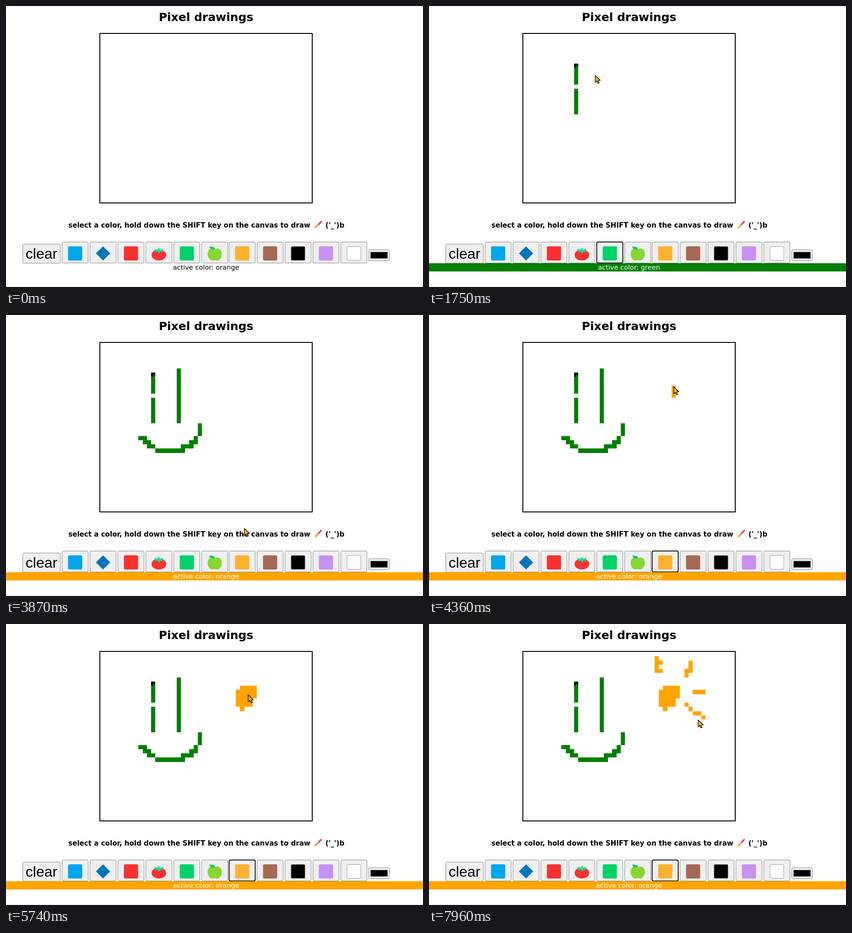
An HTML page that plays this animation: 911 by 615 pixels, repeating every 8 s.

```html
<!DOCTYPE html>
<html lang="en">
<head>
<meta charset="utf-8">
<title>Pixel drawings</title>
<style>
  html, body { margin: 0; width: 100%; height: 100%; overflow: hidden; background: #fff; }
  svg { display: block; width: 911px; height: 615px; }
  text { font-family: "DejaVu Sans", sans-serif; text-anchor: middle; }
  .bold { font-weight: bold; }
  .button { fill: #efefef; stroke: #858585; }
</style>
</head>
<body>
<svg viewBox="0 0 911 615">
  <text class="bold" x="437" y="33" font-size="25">Pixel drawings</text>
  <rect x="205" y="60" width="464" height="371" fill="none" stroke="#000" stroke-width="2"/>
  <g id="cells" shape-rendering="crispEdges"></g>
  <path id="speck" d="M317 126h9v8l-5-5v6h-4z"/>

  <text class="bold" x="400.5" y="485" font-size="15.1">select a color, hold down the SHIFT key on the canvas to draw</text>
  <g stroke-linecap="round">
    <path d="M688.5 472L681 480" stroke="#f8395c" stroke-width="3.6"/>
    <path d="M681.5 479.5L679.5 481.5" stroke="#b4acbc" stroke-width="4"/>
    <path d="M673.5 487q1-6 4-6.5q4 0 3.5 3q-1 3-7.5 3.5z" fill="#ffb43c"/>
  </g>
  <text class="bold" x="718.5" y="485" font-size="15.1">('_')b</text>

  <rect class="button" x="36.5" y="521" width="82" height="42" rx="2.5"/>
  <text x="77.5" y="553" font-size="32" style="font-family:'Liberation Sans',Arial,sans-serif">clear</text>
  <g id="buttons"></g>
  <rect class="button" x="792.5" y="533.5" width="45" height="24" rx="2.5"/>
  <rect x="796.5" y="538.5" width="37" height="14" stroke="#777"/>
  <rect id="ring" y="516.5" width="57" height="46" rx="3" fill="none" stroke="#101010" stroke-width="2"/>

  <rect id="bar" y="563" width="911" height="18"/>
  <text id="label" x="437" y="577" font-size="14.5"></text>
  <rect y="614" width="911" height="1" fill="#dedede"/>
  <path id="cursor" d="M0 0V15.3L3.6 12L6.2 17.6L8.8 16.4L6.3 11H11.3Z" fill="#fbb117" stroke="#000" stroke-width="1.2" stroke-linejoin="round"/>
</svg>
<script>
const LOOP = 8000, CELL = 9.25, LEFT = 206, TOP = 61;
const GREEN_CLICK = 420, ORANGE_CLICK = 3720;
const GREEN_BUTTON = 4, ORANGE_BUTTON = 6;
const $ = id => document.getElementById(id);
const colorAt = t => t >= GREEN_CLICK && t < ORANGE_CLICK ? 'green' : 'orange';

// Buttons
const square = (fill, stroke = fill) =>
  `<rect x="-15" y="-15" width="30" height="30" rx="2" fill="${fill}" stroke="${stroke}"/>`;
const icons = [
  square('#00a6ed'),
  '<path d="M0-15L15 0L0 15L-15 0Z" fill="#0074ba" stroke="#0074ba" stroke-linejoin="round"/>',
  square('#f8312f'),
  `<ellipse cy="3.5" rx="16" ry="12" fill="#f8312f"/>
   <path d="M-1.5-12h3v4l10-2l-5 4l4 4l-7-2l-3 5l-3-5l-7 2l3-4l-6-4l11 2z" fill="#00e58c"/>`,
  square('#00d26a'),
  `<path d="M0-8C5-13 15-11 15.5 0C16 10 9 16 5 15.5Q0 14-5 15.5C-9 16-16 10-15.5 0C-15-11-5-13 0-8Z" fill="#86d72f"/>
   <path d="M1-9q-1-7-13-6q2 9 13 6z" fill="#00cf68"/>`,
  square('#ffb02e'), square('#a56953'), square('#000', '#555'),
  square('#c790f1'), square('#fff', '#9b9b9b')
];
const buttonX = i => Math.round(122 + 60.9 * i) + 0.5;
$('buttons').innerHTML = icons.map((icon, i) =>
  `<g transform="translate(${buttonX(i)} 516.5)">
     <rect class="button" width="57" height="46" rx="2.5"/>
     <g transform="translate(28.5 25)">${icon}</g></g>`).join('');

// Shapes, each a list of grid cells in drawing order
function line(x0, y0, x1, y1, step = 1) {
  const n = Math.max(Math.abs(x1 - x0), Math.abs(y1 - y0)) / step;
  return Array.from({ length: n + 1 }, (_, i) =>
    [Math.round(x0 + (x1 - x0) * i / n), Math.round(y0 + (y1 - y0) * i / n)]);
}

function smile() {
  return Array.from({ length: 67 }, (_, i) => {
    const x = 9.7 + 0.2 * i;
    return [Math.floor(x), Math.floor(25.85 - 0.0627 * Math.abs(x - 16.45) ** 2.13)];
  });
}

// Band of a slanted ellipse, traced counterclockwise from the lower right
function sun(inner, outer) {
  const cells = [];
  for (let col = 30; col < 39; col++) {
    for (let row = 6; row < 15; row++) {
      const dx = col - 33.8, dy = row - 10.15;
      const level = dx * dx + dy * dy + 0.7 * dx * dy;
      const turn = (Math.atan2(dx, dy) - 0.5 + 2 * Math.PI) % (2 * Math.PI);
      if (level >= inner && level < outer) cells.push({ turn, at: [col, row] });
    }
  }
  return cells.sort((a, b) => a.turn - b.turn).map(cell => cell.at);
}

// Cursor stops outside the strokes: time, x, y
const path = [
  [70, 425, 606],
  [GREEN_CLICK, buttonX(GREEN_BUTTON) + 30, 545],
  [1750, 363, 152],
  [ORANGE_CLICK, buttonX(ORANGE_BUTTON) + 30, 545],
  [5740, 529, 155],
  [7960, 588, 210]
];
const cells = [];
const painted = new Set();

function stroke(start, pace, ...shapes) {
  let time = start;
  for (const [col, row] of shapes.flat()) {
    const key = col + ',' + row;
    if (painted.has(key)) continue;
    painted.add(key);
    const x = LEFT + col * CELL, y = TOP + row * CELL;
    const node = document.createElementNS('http://www.w3.org/2000/svg', 'rect');
    const attributes = { x, y, width: CELL, height: CELL, fill: colorAt(start) };
    for (const name in attributes) node.setAttribute(name, attributes[name]);
    $('cells').append(node);
    cells.push({ time, node });
    path.push([time, x + CELL * 0.3, y + CELL * 0.4]);
    time += pace;
  }
}

stroke(1080, 36, line(12, 7, 12, 11), line(12, 13, 12, 18));
stroke(1860, 32, line(18, 6, 18, 18));
stroke(2570, 20, smile(), line(23, 21, 23, 19));
stroke(4230, 50, line(35, 12, 35, 10));
stroke(4430, 34, sun(2.8, 6.8), [[33, 13]]);
stroke(4980, 85, sun(0, 2.8));
stroke(6160, 60, line(31, 1, 31, 4), line(32, 2, 32, 4, 2));
stroke(6880, 50, line(39, 2, 39, 4), line(38, 4, 38, 5));
stroke(7400, 70, line(40, 9, 42, 9));
stroke(7720, 40, line(38, 12, 42, 15));
path.sort((a, b) => a[0] - b[0]);

function cursorAt(t) {
  const next = path.findIndex(stop => stop[0] > t);
  if (next < 1) return path.at(next).slice(1);
  const [t0, x0, y0] = path[next - 1], [t1, x1, y1] = path[next];
  const u = (t - t0) / (t1 - t0), k = u * u * (3 - 2 * u);
  return [x0 + (x1 - x0) * k, y0 + (y1 - y0) * k];
}

const show = (node, on) => node.setAttribute('visibility', on ? 'visible' : 'hidden');

function draw(t) {
  cells.forEach(({ time, node }) => show(node, t >= time));
  show($('speck'), t >= cells[0].time);

  const picked = t >= GREEN_CLICK, color = colorAt(t);
  show($('bar'), picked);
  $('bar').setAttribute('fill', color);
  $('label').setAttribute('fill', picked ? '#fff' : '#000');
  $('label').textContent = 'active color: ' + color;

  // The focus ring appears once the key is held
  show($('ring'), t >= (color === 'green' ? 1000 : 4180));
  $('ring').setAttribute('x', buttonX(color === 'green' ? GREEN_BUTTON : ORANGE_BUTTON));

  show($('cursor'), t >= path[0][0]);
  $('cursor').setAttribute('transform', `translate(${cursorAt(t)})`);
}

function frame() {
  draw(performance.now() % LOOP);
  requestAnimationFrame(frame);
}
frame();
</script>
</body>
</html>
```
